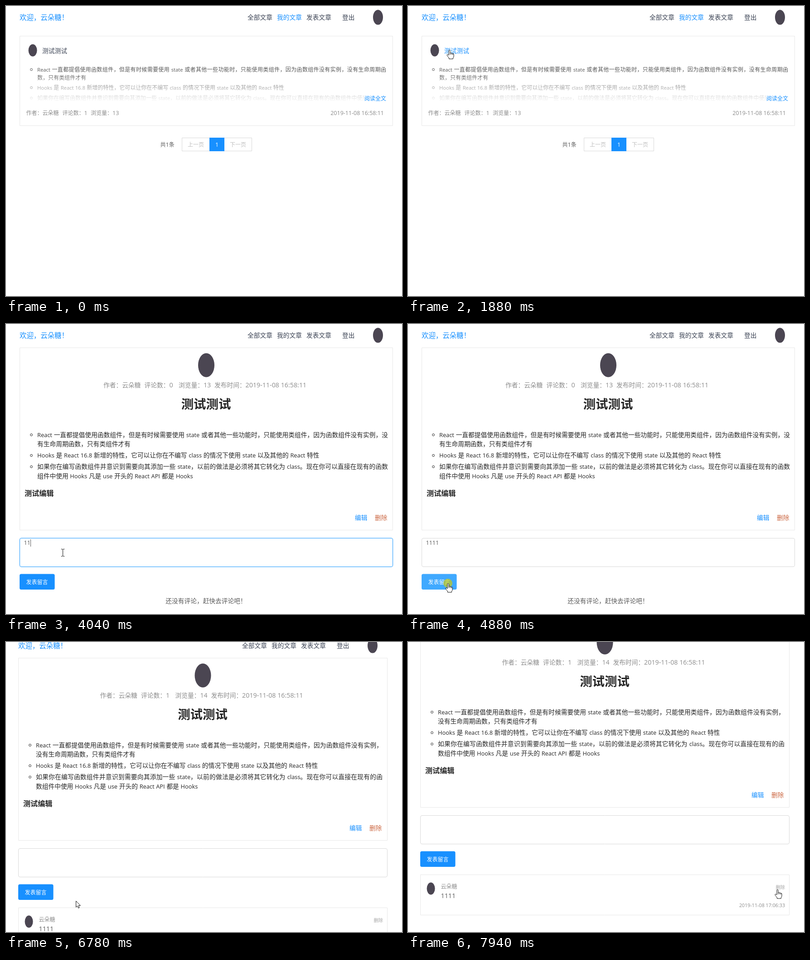
Write an HTML page with a canvas that moves like this. It is 874x641 px and loops after 8000 ms.

```html
<!DOCTYPE html>
<html lang="zh-CN">
<head>
<meta charset="utf-8">
<title>Blog comment demo</title>
<style>
  html, body { margin: 0; width: 100%; height: 100%; overflow: hidden; background: #fff; }
  canvas { display: block; width: 874px; height: 641px; }
</style>
</head>
<body>
<canvas id="stage" width="874" height="641"></canvas>
<script>
const ctx = document.getElementById('stage').getContext('2d');
const LOOP = 8000;
const BLUE = '#1890ff', HOVER = '#40a9ff', LINE = '#e8e8e8', BORDER = '#d9d9d9';
const INK = '#262626', BODY = '#595959', MUTED = '#8c8c8c', NAV = '#3b4354', DELETE = '#cb6640';
const SMALL = 12, BASE = 13.72, TINY = 10.3;
const USER = '云朵糖';

// "~", "/" and "|" mark the line breaks of the list, wide and narrow layouts.
const PARAGRAPHS = [
  'React 一直都提倡使用函数组件，但是有时候需要使用 state 或者其他一些功能时，只能使用类组件，因为函数组件没有实例，|没/有生命周期函~数，只有类组件才有',
  'Hooks 是 React 16.8 新增的特性，它可以让你在不编写 class 的情况下使用 state 以及其他的 React 特性',
  '如果你在编写函数组件并意识到需要向其添加一些 state，以前的做法是必须将其它转化为 class。现在你可以直接在现有的函|数/组件中使用 Hooks 凡是 use 开头的 React API 都是 Hooks'
];
const linesOf = (text, mark) => text.split(mark).map(s => s.replace(/[~\/|]/g, ''));

const TIMES = {
  click: 1790, open: 2170, focus: 3340, blink: 3800, typed: [3870, 4040, 4210, 4360],
  submit: 4880, toast: 5140, reload: 6220
};

const MOUSE = [
  [210, 822, 634], [500, 700, 400], [760, 480, 160], [990, 353, 76], [1200, 230, 70],
  [1450, 120, 92], [1600, 78, 102], [1720, 91, 97], [2490, 91, 97], [2870, 131, 446],
  [3150, 127, 500], [3260, 125, 505], [4330, 125, 505], [4650, 95, 565], [4730, 88, 573],
  [6150, 88, 573], [6220, 91, 573], [6320, 91, 573], [6700, 154, 572], [7090, 154, 572],
  [7500, 480, 575], [7800, 770, 560], [7920, 815, 547]
];
const SCROLL = [[6690, 0], [6780, 17], [6860, 52], [6940, 79], [7020, 90]];

function track(keys, t) {
  const i = keys.findIndex(k => k[0] > t);
  if (i < 0) return keys[keys.length - 1].slice(1);
  if (i === 0) return keys[0].slice(1);
  const a = keys[i - 1], b = keys[i], p = (t - a[0]) / (b[0] - a[0]);
  return a.slice(1).map((v, n) => v + (b[n + 1] - v) * p);
}

// Splits mixed text into Latin, CJK and space runs, each with its own font size.
function layout(str, size, weight) {
  let width = 0;
  const runs = str.match(/ +|[!-~]+|[^ -~]+/g).map(s => {
    const space = s[0] === ' ', latin = !space && /[!-~]/.test(s);
    const scale = !latin ? 1 : /^[\d:-]+$/.test(s) ? 1.04 : 0.935;
    const family = latin ? '"Open Sans", "Noto Sans", sans-serif' : '"Noto Sans CJK SC", "Noto Sans CJK", sans-serif';
    const font = `${weight} ${size * scale}px ${family}`;
    ctx.font = font;
    const w = space ? s.length * size * 0.274 : ctx.measureText(s).width;
    width += w;
    return { s, w, font, space, slots: latin ? 0 : s.length };
  });
  return { runs, width };
}

function text(str, x, y, size, color, { align = 0, weight = 400, justify = 0 } = {}) {
  const { runs, width } = layout(str, size, weight);
  const slots = runs.reduce((n, r) => n + r.slots, 0);
  const gap = justify ? (justify - width) / Math.max(1, slots - 1) : 0;
  const baseline = Math.round(y + size * 0.34);
  x -= width * align;
  ctx.fillStyle = color;
  for (const r of runs) {
    if (!r.space) {
      ctx.font = r.font;
      ctx.letterSpacing = (r.slots ? gap : 0) + 'px';
      ctx.fillText(r.s, x, baseline);
      ctx.letterSpacing = '0px';
    }
    x += r.w + r.slots * gap;
  }
}

function box(x, y, w, h, { fill, stroke, radius = 0 }) {
  ctx.beginPath();
  ctx.roundRect(x, y, w, h, radius);
  if (fill) { ctx.fillStyle = fill; ctx.fill(); }
  if (stroke) { ctx.strokeStyle = stroke; ctx.lineWidth = 1; ctx.stroke(); }
}

function avatar(x, y, w, h) {
  ctx.fillStyle = '#4b4652';
  ctx.beginPath();
  ctx.ellipse(x, y, w / 2, h / 2, 0, 0, 7);
  ctx.fill();
}

function bullet(x, y, color) {
  ctx.strokeStyle = color;
  ctx.lineWidth = 1;
  ctx.beginPath();
  ctx.arc(x, y, 2.4, 0, 7);
  ctx.stroke();
}

function header(left, shift, active) {
  text(`欢迎，${USER}！`, left, 25.5, 15.43, BLUE);
  [['全部文章', 533], ['我的文章', 598], ['发表文章', 663], ['登出', 742]].forEach(([label, x], i) =>
    text(label, x - shift, 25.5, BASE, i === active ? BLUE : NAV));
  avatar(821 - shift, 25, 22, 33);
}

function listPage(hover) {
  header(30, 0, 1);
  box(30.5, 66.5, 823, 198, { stroke: LINE });
  avatar(59, 98, 19, 27);
  text('测试测试', 80, 99.5, BASE, hover ? BLUE : NAV);

  const [first, rest] = linesOf(PARAGRAPHS[0], '~');
  text(first, 69, 141, SMALL, BODY, { justify: 770 });
  text(rest, 69, 159, SMALL, BODY);
  text(linesOf(PARAGRAPHS[1], '~')[0], 69, 181, SMALL, BODY);
  text(linesOf(PARAGRAPHS[2], '/')[0] + '组件中使用', 69, 204, SMALL, BODY);
  [141, 181, 204].forEach(y => bullet(56, y - 0.5, BODY));
  const fade = ctx.createLinearGradient(0, 145, 0, 214);
  fade.addColorStop(0, 'rgba(255,255,255,0)');
  fade.addColorStop(1, '#fff');
  ctx.fillStyle = fade;
  ctx.fillRect(40, 145, 805, 72);
  ctx.fillStyle = '#fff';
  ctx.fillRect(790, 195, 55, 20);
  text('阅读全文', 791, 204.5, SMALL, BLUE);

  text(`作者：${USER}`, 44.5, 237, SMALL, MUTED);
  text('评论数：1', 124.5, 237, SMALL, MUTED);
  text('浏览量：13', 187, 237, SMALL, MUTED);
  text('2019-11-08 16:58:11', 834, 237, SMALL, MUTED, { align: 1 });

  text('共1条', 340.5, 306.5, SMALL, BODY);
  box(388.5, 291.5, 154, 29, { stroke: BORDER });
  box(449, 291, 33, 30, { fill: BLUE });
  text('上一页', 419, 306.5, SMALL, '#bfbfbf', { align: 0.5 });
  text('1', 465.5, 306.5, SMALL, '#fff', { align: 0.5 });
  text('下一页', 512, 306.5, SMALL, '#bfbfbf', { align: 0.5 });
}

function detailPage(t, hoverButton) {
  const done = t >= TIMES.reload;
  const left = done ? 27 : 30, shift = done ? 12 : 0, right = 853 - shift;
  const mid = (left + right) / 2, width = right - left;
  const center = { align: 0.5 };

  header(left, shift, -1);
  box(left + 0.5, 52.5, width, 403, { stroke: LINE });
  avatar(mid + 0.5, 91, 36, 53);
  [[`作者：${USER}`, -226.5], [`评论数：${done ? 1 : 0}`, -136], [`浏览量：${done ? 14 : 13}`, -60.5],
   ['发布时间：2019-11-08 16:58:11', 18.5]].forEach(([s, dx]) => text(s, mid + dx, 135, BASE, MUTED));
  text('测试测试', mid, 178, 27.43, INK, { align: 0.5, weight: 700 });

  const starts = [245, 290.5, 315.5];
  PARAGRAPHS.forEach((p, i) => {
    bullet(left + 26, starts[i], INK);
    linesOf(p, done ? '|' : '/').forEach((s, n, all) =>
      text(s, left + 39, starts[i] + n * 20.5, BASE, INK, { justify: n < all.length - 1 ? width - 49 : 0 }));
  });
  text('测试编辑', left + 11, 375, 16.1, INK, { weight: 700 });
  text('编辑', right - 83, 428.5, BASE, BLUE);
  text('删除', right - 39, 428.5, BASE, DELETE);

  const focused = t >= TIMES.focus && t < TIMES.submit;
  if (focused) box(left - 0.5, 472.5, width + 2, 65, { stroke: 'rgba(24,144,255,.2)', radius: 4 });
  box(left + 0.5, 473.5, width, 63, { stroke: focused ? HOVER : BORDER, radius: 3.5 });
  const count = done ? 0 : TIMES.typed.filter(k => t >= k).length;
  if (count) text('1'.repeat(count), 39.5, 484, SMALL, BODY);
  if (focused && !(t >= TIMES.blink && t < TIMES.typed[0])) {
    ctx.fillStyle = BODY;
    ctx.fillRect(40 + count * 7, 476, 1, 16);
  }

  box(left, 552.6, 77.5, 34.4, { fill: hoverButton ? HOVER : BLUE, radius: 3.5 });
  text('发表留言', left + 38.5, 570.5, SMALL, '#fff', center);

  if (!done) {
    text('还没有评论，赶快去评论吧！', mid, 612.5, BASE, BODY, center);
    return;
  }
  box(left + 0.5, 604.5, width, 89, { stroke: LINE });
  avatar(left + 23.5, 635, 18, 27);
  text(USER, left + 45.5, 631, SMALL, MUTED);
  text('1111', left + 45.5, 651.5, BASE, BODY);
  text('删除', right - 9, 632, TINY, '#a6a6a6', { align: 1 });
  text('2019-11-08 17:06:33', right - 9, 672.5, TINY, MUTED, { align: 1 });
}

function toast(t) {
  if (t < TIMES.toast || t >= TIMES.reload) return;
  const p = Math.min(1, (t - TIMES.toast + 60) / 290);
  ctx.save();
  ctx.globalAlpha = p;
  ctx.translate(0, -8 * (1 - p));
  ctx.shadowColor = 'rgba(0,0,0,.15)';
  ctx.shadowBlur = 10;
  ctx.shadowOffsetY = 3;
  box(393.5, 14, 96, 34, { fill: '#fff', radius: 3.5 });
  ctx.shadowColor = 'transparent';
  box(407, 24, 14, 14, { fill: '#52c41a', radius: 7 });
  ctx.strokeStyle = '#fff';
  ctx.lineWidth = 1.4;
  ctx.stroke(new Path2D('M411 31l2.3 2.6 4-5'));
  text('发表成功', 428, 31, SMALL, BODY);
  ctx.restore();
}

const SHAPES = {
  arrow: new Path2D('M.5 .5V14.2L3.6 11.4L5.7 16.2L8 15.2L6 10.6H10.3Z'),
  hand: new Path2D('M-1 1.3Q.5 -.6 2 1.3V7Q3.8 5.8 4.9 7.5Q6.7 6.5 7.7 8.3Q9.9 7.6 10 10V14Q10 16.5 8.3 18V20H-.5V18Q-2.5 15.5 -4.7 12.4Q-5.5 10.4 -3.7 10.2Q-2.5 10.2 -1 12Z')
};
const FINGERS = new Path2D('M2 7V10.5M4.9 7.5V10.5M7.7 8.3V11');
const I_BEAM = new Path2D('M-3 -7.5H-1L.5 -6.5L2 -7.5H4M.5 -6.5V7.5M-3 8.5H-1L.5 7.5L2 8.5H4');

function cursor(x, y, kind) {
  ctx.save();
  ctx.translate(Math.round(x), Math.round(y));
  ctx.lineWidth = 1;
  ctx.lineJoin = 'round';
  ctx.fillStyle = '#fff';
  ctx.strokeStyle = '#111';
  if (kind === 'text') {
    ctx.stroke(I_BEAM);
  } else {
    ctx.fill(SHAPES[kind]);
    ctx.stroke(SHAPES[kind]);
    if (kind === 'hand') ctx.stroke(FINGERS);
  }
  ctx.restore();
}

function clickMark(t, x, y) {
  const pressed = [[TIMES.click, 1880], [3260, 3340], [TIMES.submit, 4970]].some(([a, b]) => t >= a && t < b);
  if (!pressed) return;
  ctx.fillStyle = 'rgba(210,205,0,.65)';
  ctx.beginPath();
  ctx.arc(x, y, 10, 0, 7);
  ctx.fill();
}

function render(t) {
  ctx.fillStyle = '#fff';
  ctx.fillRect(0, 0, 874, 641);
  const [x, y] = track(MOUSE, t);
  const [scroll] = track(SCROLL, t);
  const inside = (l, top, r, b) => x >= l && x < r && y >= top && y < b;
  let kind = 'arrow';

  if (t < TIMES.open) {
    const hover = inside(80, 90, 136, 109);
    if (hover) kind = 'hand';
    listPage(hover);
  } else {
    const onButton = inside(30, 553 - scroll, 106, 587 - scroll);
    if (onButton || inside(811, 535, 833, 550)) kind = 'hand';
    else if (inside(30, 473 - scroll, 853, 537 - scroll)) kind = 'text';
    ctx.save();
    ctx.translate(0, -Math.round(scroll));
    detailPage(t, onButton);
    ctx.restore();
    toast(t);
  }
  clickMark(t, x, y);
  if (t >= MOUSE[0][0]) cursor(x, y, kind);
}

const begin = performance.now();
(function tick() {
  render((performance.now() - begin) % LOOP);
  requestAnimationFrame(tick);
})();
</script>
</body>
</html>
```
